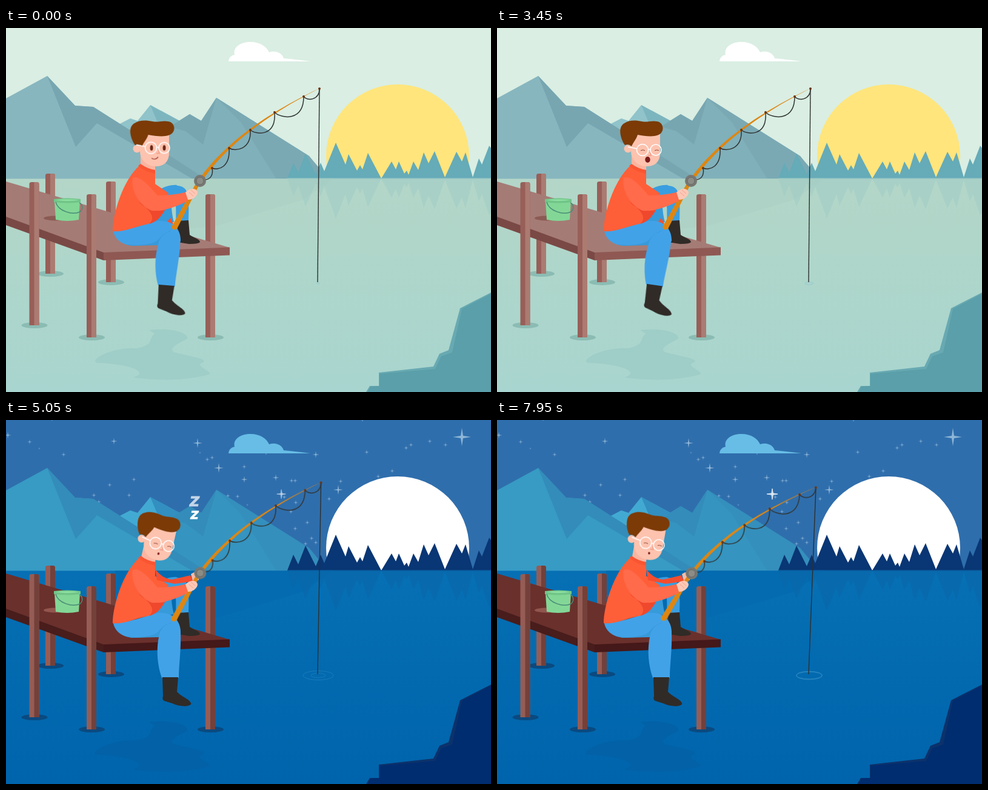
These frames come from a looping animation (800 by 600 pixels, 8000 ms). An HTML page:

```html
<!DOCTYPE html>
<html lang="en">
<head>
<meta charset="utf-8">
<title>Fishing from day to night</title>
<style>
html, body { margin: 0; width: 100%; height: 100%; overflow: hidden; background: #daeee3; }
svg { display: block; width: 100vw; height: 100vh; }
svg * { animation: 8s linear infinite; }
.wave { animation-timing-function: cubic-bezier(.37, 0, .63, 1) !important; }

/* Day (--d) to night (--n) */
.b { fill: var(--d); animation-name: blend; }
@keyframes blend { 0%, 43.75% { fill: var(--d); } 59.2%, 100% { fill: var(--n); } }
.sky { fill: var(--d); animation-name: dusk; }
@keyframes dusk { 0%, 43.75% { fill: var(--d); } 53%, 100% { fill: var(--n); } }
stop { stop-color: var(--d); animation-name: depth; }
@keyframes depth { 0%, 43.75% { stop-color: var(--d); } 59.2%, 100% { stop-color: var(--n); } }

#sun { animation-name: set; }
@keyframes set { 0%, 43.75% { transform: none; } 50%, 100% { transform: translateY(160px); } }
#moon { animation-name: rise; }
@keyframes rise { 0%, 49.8% { transform: translateY(160px); } 61.4%, 100% { transform: none; } }
#stars { animation-name: appear; }
@keyframes appear { 0%, 45% { opacity: 0; } 53%, 100% { opacity: .85; } }
#glint { transform-origin: 454px 122px; animation-name: glint; }
@keyframes glint {
  0%, 55%, 68%, 92% { opacity: 0; transform: scale(.5); }
  60.6%, 99.4%, 100% { opacity: 1; transform: none; }
}

#shin { transform-origin: 268px 345px; animation-name: swing; }
@keyframes swing {
  0% { transform: rotate(4.5deg); animation-timing-function: cubic-bezier(.61, 1, .88, 1); }
  3.1%, 16.5%, 29.8%, 43.1% { transform: rotate(8deg); }
  9.8%, 23.1%, 36.5%, 49.8%, 100% { transform: none; }
}
#head { transform-origin: 235px 232px; animation-name: nod; }
@keyframes nod {
  0%, 43.75% { transform: none; }
  55%, 86.9% { transform: rotate(16deg); }
  71.25% { transform: rotate(9.7deg); }
  100% { transform: rotate(10deg); }
}
#hair { transform-origin: 203px 170px; animation-name: hair; }
@keyframes hair { 0% { transform: translateX(1.7px) scaleX(1.03); } 20%, 100% { transform: none; } }
#gaze { animation-name: gaze; }
@keyframes gaze { 0% { transform: translate(-1px, -3.5px); } 20%, 100% { transform: none; } }
#eyes { transform-origin: 0 201px; animation-name: eyes; }
@keyframes eyes {
  0%, 8% { transform: none; opacity: 1; }
  18%, 31% { transform: scaleY(.62); opacity: 1; }
  37% { transform: scaleY(.15); opacity: 1; }
  37.1%, 100% { transform: scaleY(.15); opacity: 0; }
}
#lids { animation-name: lids; }
@keyframes lids { 0%, 37% { opacity: 0; } 37.1%, 100% { opacity: 1; } }
#smile { animation-name: smile; }
@keyframes smile { 0%, 15% { opacity: 1; } 15.1%, 100% { opacity: 0; } }
#flat { animation-name: flat; }
@keyframes flat { 0%, 15% { opacity: 0; } 15.1%, 37% { opacity: 1; } 37.1%, 100% { opacity: 0; } }
#yawn { transform-origin: 248.5px 217px; animation-name: yawn; }
@keyframes yawn { 0%, 37% { transform: scale(0); } 42%, 46% { transform: none; } 52%, 100% { transform: scale(.42); } }
.awake { animation-name: awake; }
@keyframes awake { 0%, 47% { opacity: 1; } 47.1%, 100% { opacity: 0; } }
.asleep { animation-name: asleep; }
@keyframes asleep { 0%, 47% { opacity: 0; } 47.1%, 100% { opacity: 1; } }

#rod { transform-origin: 306px 273px; animation-name: dip; }
@keyframes dip {
  0%, 43.75%, 60.1%, 77%, 93.75% { transform: none; }
  51.9%, 68.5%, 85.4%, 99.4%, 100% { transform: rotate(3deg); }
}
#line { d: path("M517 100L514 419"); animation-name: line; }
@keyframes line {
  0%, 43.75%, 60.1%, 77%, 93.75% { d: path("M517 100L514 419"); }
  51.9%, 68.5%, 85.4%, 99.4%, 100% { d: path("M526 111L514 419"); }
}
.ring { fill: none; vector-effect: non-scaling-stroke; transform-origin: 515px 421px; }
#outer { animation-name: outer; }
@keyframes outer {
  0%, 40%, 80% { transform: scale(.1); opacity: .3; }
  10.6%, 50.6%, 90.6% { transform: scale(.68); opacity: .7; }
  15%, 55%, 95% { transform: scale(.82); opacity: .7; }
  20%, 60%, 100% { transform: scale(.85); opacity: .7; }
  23.1%, 63.1% { transform: none; opacity: .25; }
  25%, 65% { transform: none; opacity: 0; }
  39.9%, 79.9% { transform: scale(.1); opacity: 0; }
}
#inner { animation-name: inner; }
@keyframes inner {
  0%, 17%, 40%, 57%, 80%, 100% { transform: scale(.1); opacity: 0; }
  23.1%, 63.1% { transform: scale(.48); opacity: .25; }
  27%, 67% { transform: scale(.8); opacity: 0; }
}

#snore { animation-name: snore; }
@keyframes snore { 0%, 51.8% { visibility: hidden; } 51.9%, 91.8% { visibility: visible; } 91.9%, 100% { visibility: hidden; } }
#snore text { font: italic 900 22px "DejaVu Sans", sans-serif; fill: #fff; stroke: #fff; text-anchor: middle; animation: big 1.6s -.65s linear infinite; }
#snore .small { font-size: 18px; animation-name: small; }
@keyframes big {
  0% { transform: translate(311px, 165px); opacity: 0; }
  15.6% { transform: translate(315px, 158px); opacity: 1; }
  40.6% { transform: translate(313px, 148px); opacity: 1; }
  56.3% { transform: translate(311px, 142px); opacity: .72; }
  80%, 100% { transform: translate(310px, 132px); opacity: 0; }
}
@keyframes small {
  0%, 8% { transform: translate(297px, 177px); opacity: 0; }
  15.6% { transform: translate(300px, 174px); opacity: .35; }
  40.6% { transform: translate(307px, 169px); opacity: 1; }
  56.3% { transform: translate(311px, 163px); opacity: 1; }
  88%, 100% { transform: translate(317px, 150px); opacity: 0; }
}
</style>
</head>
<body>
<svg viewBox="0 0 800 600" preserveAspectRatio="none">
  <defs>
    <clipPath id="horizon"><path d="M0 0H800V248.500H0Z"/></clipPath>
    <linearGradient id="water" x2="0" y2="1">
      <stop style="--d:#b3d6c8;--n:#0770b5"/>
      <stop offset=".28" style="--d:#b0d6c9;--n:#046cb1"/>
      <stop offset="1" style="--d:#a8d5cf;--n:#0064ac"/>
    </linearGradient>
    <path id="pines" d="M464 248L474 222 482 238 494 207 511 241 519 222 525 236 544 189 560 225 565 208 579 235 584 226 588 233 597 206 619 248 636 220 643 233 648 220 657 240 661 235 664 242 672 220 680 234 689 205 697 223 707 203 724 246 743 204 752 220 758 205 770 246 780 215 785 225 797 194 800 198V249H464Z"/>
  </defs>

  <path class="sky" style="--d:#daeee3;--n:#2f6eac" d="M0 0H800V260H0Z"/>
  <g id="stars" fill="#a0c3e0"></g>
  <path class="b" style="--d:#fff;--n:#67bde6" d="M367 55C368 47 373 45 377 44 374 30 389 23 403 23 420 23 430 31 434 40 446 36 456 42 458 50 472 51 487 53 502 55Z"/>
  <g clip-path="url(#horizon)">
    <circle id="sun" class="wave" cx="646" cy="211" r="118" fill="#ffe57c"/>
    <circle id="moon" class="wave" cx="646" cy="211" r="118" fill="#fff"/>
  </g>

  <g id="mountains">
    <path class="b" style="--d:#90c3ca;--n:#42aad2" d="M180 162L205 149 217 153 238 127 290 155V249H180Z"/>
    <path class="b" style="--d:#7db5bf;--n:#328fc0" d="M238 127L290 155 280 180 252 160Z"/>
    <path class="b" style="--d:#80b0ba;--n:#3594c0" d="M225 190L303 142 322 153 347 115 500 211 530 249H225Z"/>
    <path class="b" style="--d:#77a6b1;--n:#338cb9" d="M270 163L303 142 322 153 347 115 325 192 296 170Z"/>
    <path class="b" style="--d:#7aa9b4;--n:#348fbc" d="M347 115L500 211 532 249H446L388 156Z"/>
    <path class="b" style="--d:#87b6bf;--n:#379bc4" d="M0 116L68 79 114 128 144 130 330 249H0Z"/>
    <path class="b" style="--d:#77a6b1;--n:#338cb9" d="M68 79L114 128 144 130 220 178 330 249H308L150 157 115 196Z"/>
  </g>
  <use href="#pines" class="b" style="--d:#65abb8;--n:#093674"/>

  <path fill="url(#water)" d="M0 248.500H800V600H0Z"/>
  <path class="b" style="--d:#aed2c5;--n:#046bb0" d="M180 248.500H540L490 283 345 327 180 340Z"/>
  <g transform="matrix(1 0 0 -1.120 0 526)" opacity=".55"><use href="#pines" class="b" style="--d:#a0cdc5;--n:#0a66a8"/></g>
  <path class="b" style="--d:#9fcdc7;--n:#0261a7" d="M236 498C268 494 301 501 299 512 285 520 268 527 276 534 300 541 334 545 325 551 308 557 342 566 335 571 300 581 255 582 210 576 240 567 201 553 150 552 136 548 173 526 215 528 247 523 234 509 246 504Z"/>
  <path class="b" style="--d:#68a9b2;--n:#0c326b" d="M594 600L600 590H615V568L705 558 715 537 730 531 749 462 800 436V600Z"/>
  <path class="b" style="--d:#5a9fa9;--n:#002c70" d="M597 600L601 591 616 590V570L708 562 718 541 736 535 752 463 800 438V600Z"/>
  <ellipse id="outer" class="ring" cx="515" cy="421" rx="25" ry="7.500" stroke="#69b4d8"/>
  <ellipse id="inner" class="ring" cx="515" cy="421" rx="25" ry="7.500" stroke="#69b4d8"/>

  <g id="backPosts"></g>
  <path class="b" style="--d:#a57b75;--n:#6a302c" d="M0 253L369 362 160 371 0 312Z"/>
  <path class="b" style="--d:#7a4945;--n:#481d1c" d="M0 311L161 370V383L0 325Z"/>
  <path class="b" style="--d:#8f5853;--n:#451819" d="M161 370L369 361.500V374.500L161 383Z"/>
  <g id="frontPosts"></g>
  <ellipse class="b" style="--d:#8b5a53;--n:#92564e" cx="83" cy="313.500" rx="21" ry="4"/>
  <g id="bucket">
    <path fill="#83d796" d="M80 285L82 316Q101 320 120 316L122 285Z"/>
    <path fill="#70c487" d="M79 282Q101 279 123 282V287Q101 290 79 287Z"/>
    <path fill="#8de0a0" d="M81 283.500Q101 281 121 283.500 101 287 81 283.500Z"/>
    <path fill="none" stroke="#4a8b78" stroke-width="1.500" d="M82 287C86 302 110 309 122 303 128 298 126 290 121 288"/>
  </g>

  <g id="man">
    <path fill="#379ad9" d="M248 271C257 262 272 258 282 259 270 278 272 300 277 320L232 328Z"/>
    <path fill="#399ee0" d="M252 268C264 258 289 256 296 266 302 275 302 298 301 319H281C279 303 284 284 271 277Z"/>
    <path fill="#302b27" d="M282 318L301 317 303 341C310 346 320 348 320 353Q318 356 302 356L283 353Z"/>
    <g class="awake"><path fill="#f4502f" d="M262 324L271 313 276 323Z"/><path fill="#fdd3c3" d="M266 323L277 323 281 332 272 335Z"/></g>
    <path fill="#42a2e8" d="M177 335C202 334 228 324 250 318 276 315 289 333 288 351 283 360 266 361 252 357L208 359C189 357 179 346 177 335Z"/>
    <path fill="#379ad9" d="M196 356C222 360 243 357 252 348 257 341 264 336 274 333 262 340 257 348 252 358L208 359Z"/>
    <g id="shin" class="wave">
      <path fill="#42a2e8" d="M288 350C289 380 285 404 285 425H257C249 402 248 378 252 358 255 332 286 326 288 350Z"/>
      <path fill="#302b27" d="M258 424H284L282 448C290 457 304 460 305.500 468 301 474 285 472 274 467L261 463Q257 461 259 455Z"/>
    </g>
    <path fill="#ff5f38" d="M221 226L246 234V257L268 272 262 300C254 314 244 321 230 324 210 328 194 337 176 335 176 308 192 251 221 226Z"/>
    <path fill="#ef482c" d="M218 286C230 298 244 304 262 300 254 314 247 320 236 323 248 313 238 300 218 286Z"/>
    <g class="asleep">
      <path fill="#f44d2f" d="M246 246C254 256 263 262 274 263L304 256 309 266 278 270 249 264Z"/>
      <path fill="#fbbba7" d="M305 254Q313 248 319 253L318 264 308 265Z"/>
    </g>
    <g id="head" class="wave">
      <path fill="#fbb49f" d="M222 200H246V234Q238 240 222 227Z"/>
      <path fill="#fdc3af" d="M221 175H269V206C269 220 261 228 247 228 232 228 221 217 221 203Z"/>
      <circle cx="216" cy="199" r="6.500" fill="#fdc3af"/>
      <path id="hair" fill="#7c3a06" d="M211 193C203 182 199 163 210 157 218 151 230 152 239 154 248 156 255 152 264 154 272 155 276 164 272 171 267 181 248 179 232 176 230 183 225 188 222 195Q217 190 211 193Z"/>
      <g id="gaze">
        <g id="eyes" fill="#6d2a18"><ellipse cx="241" cy="201" rx="2.500" ry="4.500"/><ellipse cx="262" cy="201" rx="2.500" ry="4.500"/></g>
        <path id="lids" fill="none" stroke="#8a4736" d="M237 202Q241 200 244 202M260 202Q264 200 267 202"/>
        <path fill="none" stroke="#f19c89" stroke-width="1.500" d="M252 204L254 210H249"/>
        <g fill="none" stroke="#fff" stroke-width="1.500"><circle cx="240" cy="201" r="9.500"/><circle cx="262" cy="201" r="9"/><path d="M216 196L231 199M249 200H253"/></g>
        <g fill="none" stroke="#a44a3d" stroke-width="1.300"><path id="smile" d="M241 218Q247 222 252 216"/><path id="flat" d="M243 217H254"/></g>
        <ellipse id="yawn" cx="248.500" cy="217" rx="4.200" ry="5" fill="#7b1a1b"/>
      </g>
    </g>
    <path fill="#f95532" d="M218 227L222 224Q233 232 246 234V240Q230 238 218 227Z"/>
    <path id="line" class="wave" fill="none" stroke="#2d302f" stroke-width="1.400"/>
    <g id="rod" class="wave">
      <path fill="#de8611" d="M273 328L311 260C345 209 402 154 517 99.500 403 157 348 213 317 262L282 331Q275 335 273 328Z"/>
      <path fill="none" stroke="#303432" stroke-width="1.500" d="M328 250C338 250 342 241 340 231 350 235 370 230 368 198 378 204 405 201 403 168 412 176 446 180 443 139 455 150 491 154 491 113 497 121 517 119 517 100"/>
      <path stroke="#6a3512" stroke-width="4" stroke-linecap="round" d="M340 231h.01M368 198h.01M403 168h.01M443 139h.01M491 113h.01M517 100h.01"/>
      <circle cx="320" cy="252" r="10" fill="#777773"/>
      <circle cx="320" cy="252" r="6" fill="#8c8c87" stroke="#686864"/>
    </g>
    <path fill="#ff6b4b" d="M209 247C221 243 233 257 250 276 266 276 284 274 298 270L300 285C283 294 258 303 240 301 221 293 205 268 209 247Z"/>
    <path fill="#fdc8b6" d="M296 271C303 263 314 263 316 271 316 277 307 284 300 283Z"/>
    <path fill="none" stroke="#f1a28f" d="M305 267L312 273M302 271L309 277"/>
  </g>
  <g id="snore"><text>Z</text><text class="small">Z</text></g>
</svg>
<script>
const byId = id => document.getElementById(id);

function addPath(parent, d, attributes = {}) {
  const path = document.createElementNS('http://www.w3.org/2000/svg', 'path');
  path.setAttribute('d', d);
  for (const [key, value] of Object.entries(attributes)) path.setAttribute(key, value);
  parent.append(path);
}

const blend = (day, night) => ({ class: 'b', style: `--d:${day};--n:${night}` });

function addPost(parent, x, top, bottom) {
  const half = 8;
  addPath(parent, `M${x - 21} ${bottom}a21 5 0 0 1 43 0a21 5 0 0 1 -43 0`, blend('#8bbcb3', '#0a4a80'));
  addPath(parent, `M${x - half} ${bottom}V${top + 3}q0 -3 4 -3h${half}q4 0 4 3V${bottom}Z`, blend('#985f58', '#955d55'));
  addPath(parent, `M${x} ${bottom}V${top}h4q4 0 4 3V${bottom}Z`, blend('#ab7b72', '#74403a'));
}

const back = byId('backPosts'), front = byId('frontPosts');
addPost(back, 73, 240, 405);
addPost(back, 173, 253, 419);
addPost(back, 337, 274, 510);
addPost(front, 46.5, 254, 490);
addPost(front, 141, 274, 510);

function addStar(x, y, r, attributes) {
  const w = r * .13;
  addPath(byId('stars'), `M${x} ${y - r}L${x + w} ${y - w} ${x + r} ${y} ${x + w} ${y + w} ${x} ${y + r} ${x - w} ${y + w} ${x - r} ${y} ${x - w} ${y - w}Z`, attributes);
}

const starsByRadius = {
  2: [[55, 47], [76, 0], [320, 54], [398, 140], [429, 56], [588, 1]],
  4: [[39, 36], [95, 57], [171, 107], [211, 98], [145, 124], [153, 135], [203, 124], [332, 65],
      [340, 62], [393, 77], [366, 125], [382, 126], [459, 127], [471, 100], [477, 100], [533, 130],
      [552, 101], [550, 180], [470, 151], [478, 136], [497, 169], [477, 179], [494, 204], [504, 195],
      [511, 202], [595, 53], [614, 93], [637, 84], [660, 46], [668, 41], [699, 35], [725, 41],
      [622, 157], [594, 183], [588, 160]],
  5.5: [[3, 25], [178, 35], [393, 98], [445, 95], [455, 122], [511, 57]],
  8: [[316, 38], [351, 79], [548, 115]],
  10: [[705, 132]],
  15: [[752, 28]]
};
for (const [radius, places] of Object.entries(starsByRadius))
  for (const [x, y] of places) addStar(x, y, +radius);
addStar(454, 122, 9, { id: 'glint', fill: '#fff', stroke: '#fff' });
</script>
</body>
</html>
```
